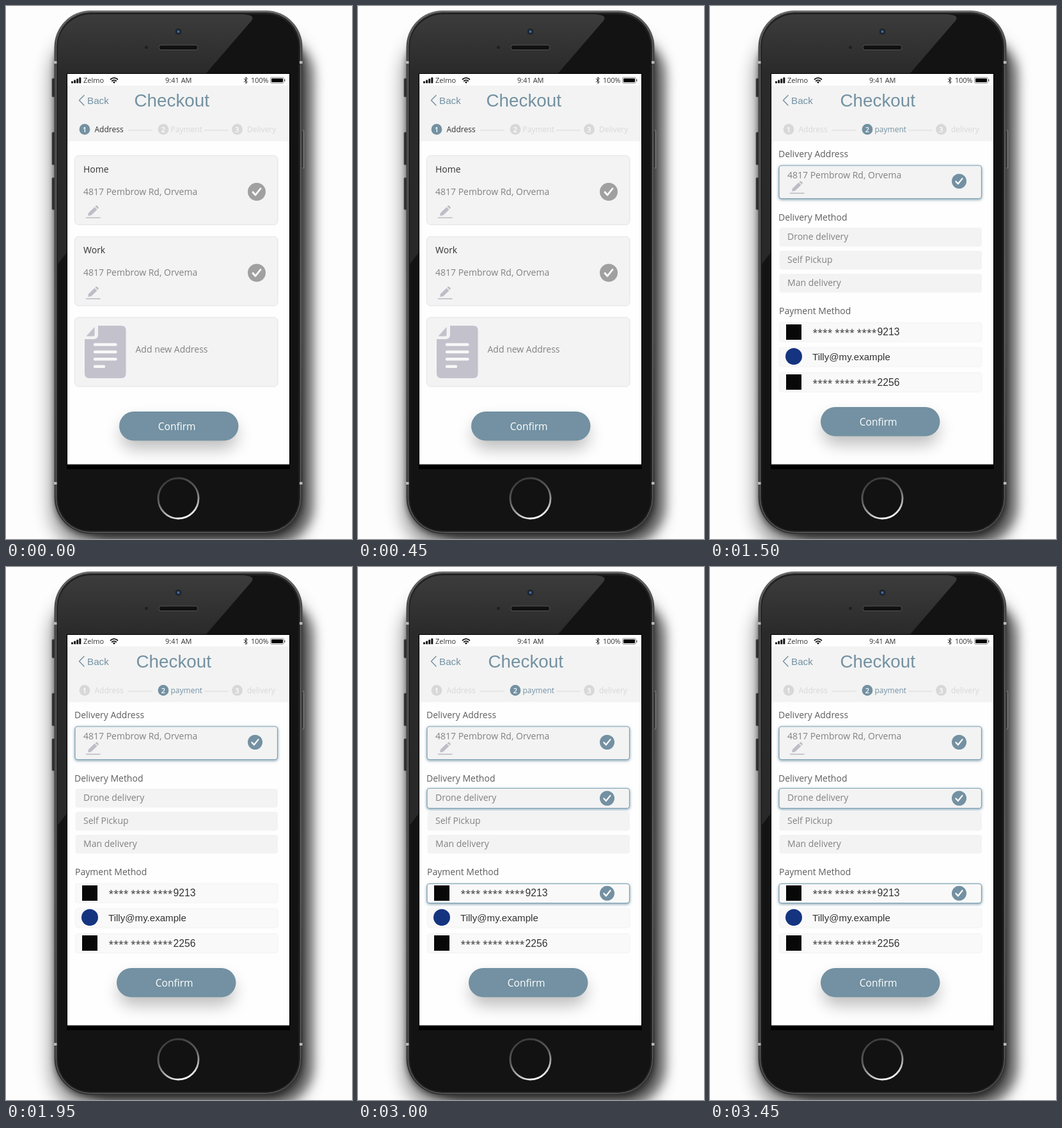
Write an HTML page that moves like this. It is 541 px wide and 832 px high and loops after 3.75 s.

```html
<!DOCTYPE html>
<html lang="en">
<head>
<meta charset="utf-8">
<title>Checkout</title>
<style>
html, body { margin: 0; width: 100%; height: 100%; overflow: hidden; background: #fdfdfd; }
svg { display: block; width: 541px; height: 832px; }
text { font-family: "Open Sans", "Noto Sans", sans-serif; font-size: 14px; white-space: pre; }
.arial { font-family: "Liberation Sans", Arial, sans-serif; }
</style>
</head>
<body>
<svg viewBox="0 0 541 832" xmlns="http://www.w3.org/2000/svg">
  <defs>
    <filter id="soft" x="-30%" y="-20%" width="160%" height="140%"><feGaussianBlur stdDeviation="15"/></filter>
    <filter id="mid" x="-20%" y="-20%" width="140%" height="140%"><feGaussianBlur stdDeviation="8"/></filter>
    <filter id="near" x="-20%" y="-20%" width="140%" height="140%"><feGaussianBlur stdDeviation="4"/></filter>
    <filter id="glow" x="-40%" y="-120%" width="180%" height="340%"><feGaussianBlur stdDeviation="13"/></filter>
    <filter id="lift" x="-5%" y="-40%" width="110%" height="190%"><feDropShadow dx="0" dy="1.5" stdDeviation="2" flood-color="#5f8499" flood-opacity=".8"/></filter>
    <linearGradient id="rim" x2="0" y2="1">
      <stop stop-color="#6b6b6b"/><stop offset=".08" stop-color="#424242"/>
      <stop offset=".6" stop-color="#4c4c4c"/><stop offset="1" stop-color="#343434"/>
    </linearGradient>
    <linearGradient id="glare" gradientUnits="userSpaceOnUse" x1="0" y1="12" x2="0" y2="400">
      <stop stop-color="#3c3c3c"/><stop offset=".24" stop-color="#2a2a2a"/><stop offset="1" stop-color="#282828"/>
    </linearGradient>
    <linearGradient id="ring" x1=".3" y1="0" x2=".65" y2="1">
      <stop stop-color="#3a3a3a"/><stop offset=".45" stop-color="#606060"/>
      <stop offset=".75" stop-color="#b0b0b0"/><stop offset="1" stop-color="#fff"/>
    </linearGradient>
    <clipPath id="face"><rect x="81" y="13" width="376.500" height="806" rx="51"/></clipPath>
  </defs>

  <rect width="541" height="832" fill="#fdfdfd"/>
  <rect x="72" y="46" width="400" height="800" rx="60" opacity=".46" filter="url(#soft)"/>
  <rect x="110" y="50" width="371" height="787" rx="58" opacity=".42" filter="url(#mid)"/>
  <rect x="75" y="36" width="390" height="792" rx="57" opacity=".45" filter="url(#near)"/>

  <g fill="#2c2c2c" stroke="#555" stroke-width=".8">
    <rect x="72" y="113" width="6" height="29" rx="1.500"/>
    <rect x="72" y="197" width="6" height="51" rx="1.500"/>
    <rect x="72" y="268" width="6" height="50" rx="1.500"/>
    <rect x="460" y="194" width="5.500" height="59" rx="1.500" stroke="#aaa"/>
  </g>
  <rect x="75.500" y="7" width="388" height="817" rx="57" fill="url(#rim)"/>
  <rect x="78.500" y="9.500" width="382" height="812" rx="54" fill="#222" stroke="#777" stroke-width=".8"/>
  <g fill="#b8b8b8">
    <rect x="75" y="86" width="4.500" height="4"/><rect x="459" y="86" width="4.500" height="4"/>
    <rect x="75" y="743" width="4.500" height="4"/><rect x="459" y="743" width="4.500" height="4"/>
  </g>
  <g clip-path="url(#face)">
    <rect x="78" y="10" width="383" height="812" fill="#131313"/>
    <path d="M70 0H370V13Q392 14 383 24L312 106L80 404H70Z" fill="url(#glare)"/>
  </g>
  <circle cx="269.500" cy="40" r="5" fill="#22252b"/>
  <circle cx="269.500" cy="40" r="2" fill="#3f6cae"/>
  <circle cx="219.500" cy="64.500" r="2.500" fill="#1f1f1f"/>
  <rect x="239" y="61" width="61" height="7.500" rx="3.700" fill="#111" stroke="#555"/>
  <circle cx="269.500" cy="768.500" r="31.500" fill="#121212" stroke="url(#ring)" stroke-width="2.800"/>

  <rect x="95" y="105" width="349" height="618" fill="#000"/>
  <rect x="96" y="106" width="347" height="609.500" fill="#fefefe"/>
  <rect x="96" y="124" width="347" height="87" fill="#f3f3f3"/>
  <g id="bar"></g>
  <g id="first"></g>
  <g id="second"></g>
</svg>
<script>
const BLUE = '#7391a2', GREY = '#828282', PALE = '#d8d8d8', PANEL = '#f3f3f3';
const STREET = '4817 Pembrow Rd, Orvema';
const $ = id => document.getElementById(id);

const text = (x, y, s, fill = GREY, more = '') => `<text x="${x}" y="${y}" fill="${fill}" ${more}>${s}</text>`;
const size = n => `style="font-size:${n}px"`;
const arial = n => `class="arial" ${size(n)}`;
const box = (x, y, w, h, r, fill, more = '') =>
  `<rect x="${x}" y="${y}" width="${w}" height="${h}" rx="${r}" fill="${fill}" ${more}/>`;
const line = (d, stroke, w) =>
  `<path d="${d}" fill="none" stroke="${stroke}" stroke-width="${w}" stroke-linecap="round" stroke-linejoin="round"/>`;

const tick = (x, y, r, fill, id = '') =>
  `<g transform="translate(${x} ${y}) scale(${r / 14})"><circle ${id && `id="${id}"`} r="14" fill="${fill}"/>` +
  line('M-6 .5L-2 5L6 -5', '#fff', 2.8) + '</g>';

const pencil = y => `<g transform="translate(125 ${y})" fill="#bebdc7">
  <path d="M3 16.500L4 12L13.500 2.700L17.500 6.700L8 15.700Z"/>
  <path d="M14.500 1.800L15.700.600Q16.800 0 17.700.900L19.500 2.700Q20.200 3.600 19.400 4.600L18.400 5.700Z"/>
  <rect y="18.700" width="22.500" height="1.600"/></g>`;

const button = (x, y) =>
  box(x + 3, y + 15, 181, 43, 21, '#000', 'opacity=".26" filter="url(#glow)"') +
  box(x, y, 186.5, 45.5, 22.7, BLUE) + text(x + 60.7, y + 29, 'Confirm', '#fff', size(15.6));

const glowing = (y, h, fill, body) =>
  box(108, y, 316.5, h, 4, fill, 'stroke="#7fa3b5" stroke-width="1.2" filter="url(#lift)"') + body;

function steps(labels, active, ink) {
  const cx = [123, 246, 361.5], tx = [138.5, 257.5, 377];
  return labels.map((s, i) => {
    const on = i === active;
    return `<circle cx="${cx[i]}" cy="192.500" r="8.400" fill="${on ? BLUE : PALE}"/>` +
      text(cx[i], 196.7, i + 1, '#fff', 'text-anchor="middle" style="font-size:11px;font-weight:600"') +
      text(tx[i], 197.3, s, on ? ink : PALE, size(12));
  }).join('') + line('M191 194H228M310 194H347', '#dadada', 1.2);
}

const title = x => text(x, 157, 'Checkout', BLUE, arial(27.8));

function statusBar() {
  const bars = [3, 5, 7, 9].map((h, i) => box(102 + i * 4.1, 120.5 - h, 3, h, .6, '#111')).join('');
  return bars + text(121, 120, 'Zelmo', '#333', size(11)) +
    line('M163.500 114.500Q169 109.800 174.500 114.500M165.700 117Q169 114.200 172.300 117', '#111', 1.7) +
    '<path d="M167 118.500Q169 117 171 118.500L169 121Z" fill="#111"/>' +
    text(249, 120, '9:41 AM', '#333', size(11)) +
    line('M372.500 113.500L377.300 118.500L375 121V111L377.300 113.500L372.500 118.500', '#222', 1) +
    text(410.5, 120, '100%', '#333', 'text-anchor="end" ' + size(10.8)) +
    box(413.5, 111.5, 21, 9, 2, 'none', 'stroke="#777" stroke-width=".8"') +
    box(415, 113, 18, 6, 1, '#000') + box(435.3, 114.3, 1.3, 3.4, .6, '#555') +
    line('M122 139.500L114.500 147.300L122 155', BLUE, 1.4) + text(127, 152.5, 'Back', BLUE, arial(15.2));
}

function addressView() {
  const card = y => box(107.5, y, 317.5, 108, 6, PANEL, 'stroke="#e3e3e3"');
  const place = (y, name, id) => card(y) + text(121, y + 26.2, name, '#333') +
    text(121, y + 61.2, STREET) + pencil(y + 77.5) + tick(392, y + 56.5, 14, '#a0a0a0', id);
  return title(200.5) + steps(['Address', 'Payment', 'Delivery'], 0, '#333') +
    place(233.5, 'Home', 'home') + place(360, 'Work') + card(486) +
    '<path d="M144 499H180Q187.500 499 187.500 506V574Q187.500 581 180 581H130.500Q123 581 123 574V520H137Q144 520 144 513Z" fill="#c3c1cb"/>' +
    '<path d="M125.500 515.500L138.500 501V513Q138.500 515.500 136 515.500Z" fill="#c3c1cb"/>' +
    line('M139 528.500H171.500M139 540H171.500M139 551.300H171.500M139 562.700H153', '#f8f8f8', 4.4) +
    text(202.5, 541, 'Add new Address') + button(177, 633);
}

function paymentView() {
  const row = (y, s) => box(108.5, y, 316.5, 29.5, 4, PANEL) + text(121, y + 18.7, s);
  const pay = y => box(108.5, y, 316.5, 30, 4, '#f9f9f9', 'stroke="#f2f2f2"');
  const card = (y, last) => text(160.5, y + 1, '**** **** ****', '#333') +
    text(261.5, y, last, '#333', arial(15.7));
  const logo = y => box(119, y, 24, 24, 0, '#080808');
  const heading = (x, y, s) => text(x, y, s, '#5e5e5e');
  return title(203.5) + steps(['Address', 'payment', 'delivery'], 1, BLUE) +
    heading(107, 236, 'Delivery Address') +
    glowing(249, 51.5, PANEL, text(121, 269, STREET) + pencil(272.8) + tick(389.5, 273.5, 11.5, BLUE)) +
    heading(107, 334.8, 'Delivery Method') +
    row(346, 'Drone delivery') + row(382, 'Self Pickup') + row(418, 'Man delivery') +
    `<g id="drone">${glowing(345.5, 31, PANEL, text(121, 364.7, 'Drone delivery') + tick(389.5, 361, 11.5, BLUE))}</g>` +
    heading(108, 480.8, 'Payment Method') + pay(494) + pay(533) + pay(572.5) +
    `<g id="paid">${glowing(494.5, 30, '#f9f9f9', tick(389.5, 509.3, 11.5, BLUE))}</g>` +
    logo(497) + card(514, '9213') +
    '<circle cx="131" cy="547" r="13" fill="#15347f"/>' + text(160, 553, 'Tilly@my.example', '#333', arial(15.1)) +
    logo(575) + card(592.5, '2256') + button(173, 626);
}

$('bar').innerHTML = statusBar();
$('first').innerHTML = addressView();
$('second').innerHTML = paymentView();

const show = (id, on) => $(id).setAttribute('display', on ? 'inline' : 'none');

function draw(now) {
  const stage = Math.floor(now % 3750 / 750);
  show('first', stage < 2);
  show('second', stage >= 2);
  $('home').setAttribute('fill', stage ? BLUE : '#a0a0a0');
  show('drone', stage >= 3);
  show('paid', stage >= 4);
}

let start;
function loop(now) {
  start ??= now;
  draw(now - start);
  requestAnimationFrame(loop);
}
draw(0);
requestAnimationFrame(loop);
</script>
</body>
</html>
```
